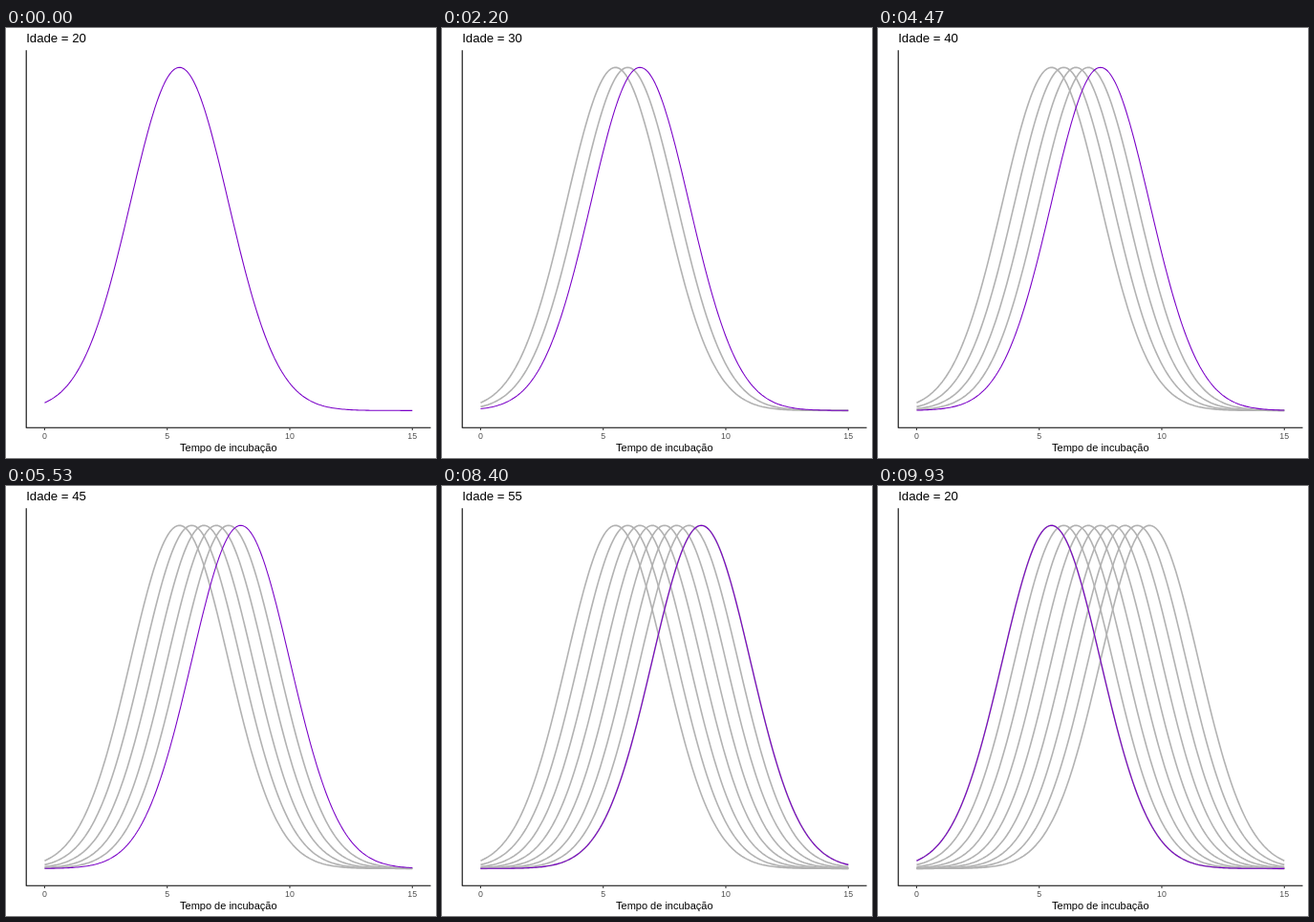
An HTML page that plays this animation: 450 px wide and 450 px high, repeating every 10 s.

```html
<!DOCTYPE html>
<html lang="pt">
<head>
<meta charset="utf-8">
<title>Tempo de incubação</title>
<style>
  html, body { margin: 0; width: 100%; height: 100%; overflow: hidden; background: #fff; }
  svg { display: block; width: 450px; height: 450px; font-family: "Liberation Sans", Arial, sans-serif; }
  path { fill: none; stroke-linejoin: round; }
  .axis { stroke: #000; stroke-width: 1.07; stroke-linecap: butt; }
  .tick { stroke: #333; stroke-width: 1.07; }
  .past { stroke: #b2b2b2; stroke-width: 1.6; }
  #now { stroke: #7a00c7; stroke-width: 1.07; }
  .label { font-size: 8.8px; fill: #4d4d4d; text-anchor: middle; }
</style>
</head>
<body>
<svg viewBox="0 0 450 450">
  <text id="title" x="21.2" y="15" font-size="13.2">Idade = 20</text>
  <g id="shadows"></g>
  <path id="now"/>
  <path class="axis" d="M21.2 23.3V418.3H444.5"/>
  <g id="ticks"></g>
  <text x="232.8" y="443" font-size="11" text-anchor="middle">Tempo de incubação</text>
</svg>
<script>
const LOOP = 10000, FPS = 15, MOVE = 7;
const LEFT = 40.44, RIGHT = 425.26, BASE = 400.35, HEIGHT = 359.1;
const STARTS = [9, 26, 43, 60, 76, 93, 110, 126, 142]; // first step of each transition
const COUNT = STARTS.length;

const byId = id => document.getElementById(id);
const px = x => LEFT + (RIGHT - LEFT) * x / 15;
const bell = (x, state) => Math.exp(-(((x - 5.5 - state / 2) / 2) ** 2) / 2);

function add(parent, tag, attrs) {
  const el = document.createElementNS("http://www.w3.org/2000/svg", tag);
  for (const key in attrs) el.setAttribute(key, attrs[key]);
  return parent.appendChild(el);
}

// Heights blend between two states; x stays on a fixed grid.
function curve(from, to, mix) {
  const points = [];
  for (let i = 0; i <= 200; i++) {
    const x = i * 15 / 200;
    const y = bell(x, from) * (1 - mix) + bell(x, to) * mix;
    points.push(px(x).toFixed(2) + " " + (BASE - HEIGHT * y).toFixed(2));
  }
  return "M" + points.join("L");
}

for (const value of [0, 5, 10, 15]) {
  add(byId("ticks"), "path", { class: "tick", d: `M${px(value)} 418.3v2.75` });
  add(byId("ticks"), "text", { class: "label", x: px(value), y: 430 }).textContent = value;
}
const shadows = STARTS.map((_, i) =>
  add(byId("shadows"), "path", { class: "past", d: curve(i, i, 0) }));

let shown = -1;
function draw(step) {
  if (step === shown) return;
  shown = step;
  const passed = STARTS.filter(start => start <= step).length;
  const from = Math.max(passed - 1, 0);
  const to = passed % COUNT;
  const mix = passed ? Math.min((step - STARTS[from]) / MOVE, 1) : 0;
  shadows.forEach((path, i) => { path.style.display = i < passed ? "" : "none"; });
  byId("now").setAttribute("d", curve(from, to, mix));
  byId("title").textContent = "Idade = " + (20 + 5 * (mix < 0.5 ? from : to));
}

function tick() {
  // Step times are rounded to hundredths of a second.
  const time = Math.floor(performance.now() % LOOP / 10) * 10;
  draw(Math.floor((time + 3.4) * FPS / 1000) % 150);
  requestAnimationFrame(tick);
}
tick();
</script>
</body>
</html>
```
